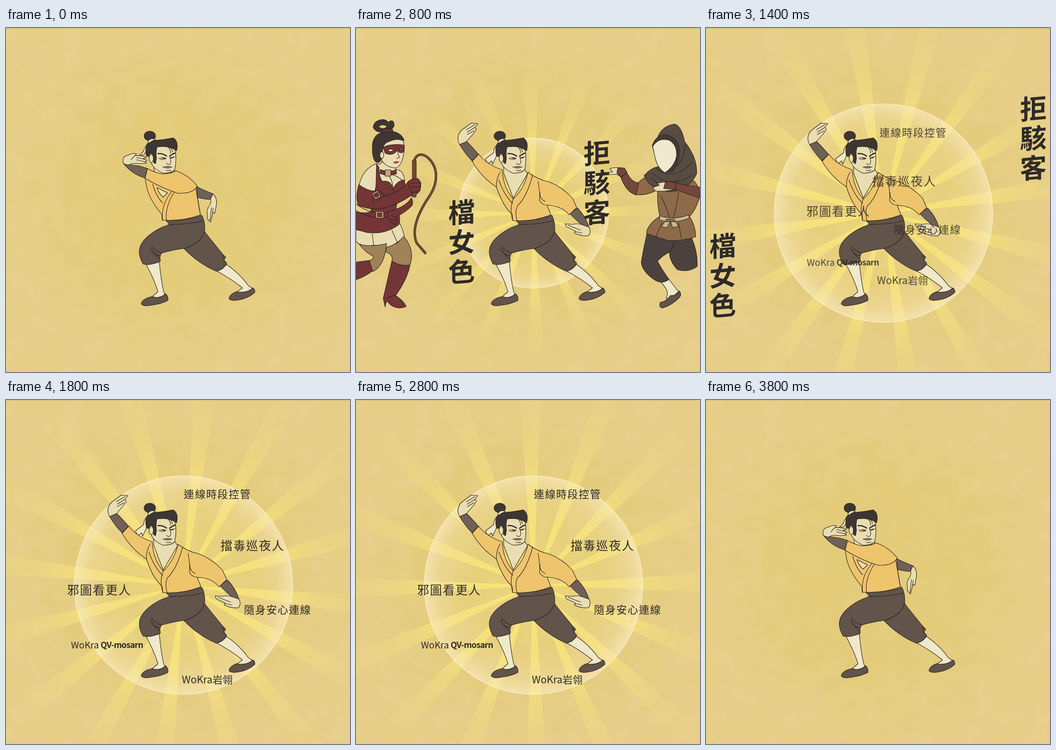
Write an HTML page that moves like this. It is 720x720 px and loops after 4000 ms.

```html
<!DOCTYPE html>
<html lang="zh-Hant">
<head>
<meta charset="utf-8">
<style>
  html, body { margin: 0; width: 100%; height: 100%; overflow: hidden; background: #e3cb7c; }
  svg { position: absolute; left: 0; top: 0; width: 100vw; height: 100vh; }
  .ink path, .ink ellipse, .ink rect { stroke: #2c231d; stroke-width: 1.1; stroke-linejoin: round; stroke-linecap: round; }
  .ink .line { fill: none; }
  .ink .bare { stroke: none; }
  .skin { fill: #e9deb2; }
  .sock { fill: #efe8cb; }
  .hair { fill: #3d3632; }
  .pants { fill: #62534b; }
  .cuff { fill: #706157; }
  .shirt { fill: #eec56d; }
  .red { fill: #743537; }
  .stocking { fill: #a08259; }
  .hood { fill: #574b44; }
  .coat { fill: #8d6b4a; }
  .glove { fill: #74473a; }
  .trousers { fill: #4b413e; }
  text { font-family: "Noto Sans CJK TC", "Noto Sans CJK", Lato, sans-serif; fill: #2d2a28; dominant-baseline: central; }
  #words text { font-size: 56px; font-weight: 700; text-anchor: middle; }
</style>
</head>
<body>
<svg viewBox="0 0 720 720">
  <defs>
    <filter id="paper" x="0" y="0" width="100%" height="100%">
      <feTurbulence type="fractalNoise" baseFrequency=".025" numOctaves="4" seed="4"/>
      <feColorMatrix values="0 0 0 0 .92  0 0 0 0 .82  0 0 0 0 .62  1.6 0 0 0 -.55"/>
    </filter>
    <radialGradient id="vignette">
      <stop offset=".4" stop-color="#e3ca70" stop-opacity=".35"/>
      <stop offset="1" stop-color="#e8d093" stop-opacity=".4"/>
    </radialGradient>
  </defs>
  <rect width="720" height="720" filter="url(#paper)" opacity=".22"/>
  <rect width="720" height="720" fill="url(#vignette)"/>
  <rect width="720" height="1" fill="#cdb565"/>
</svg>

<svg viewBox="0 0 720 720">
  <defs>
    <radialGradient id="beam" gradientUnits="userSpaceOnUse" cx="0" cy="0" r="460">
      <stop offset="0" stop-color="#fbe973" stop-opacity=".95"/>
      <stop offset=".45" stop-color="#f7e57a" stop-opacity=".72"/>
      <stop offset=".65" stop-color="#f1dd82" stop-opacity=".45"/>
      <stop offset="1" stop-color="#efda84" stop-opacity="0"/>
    </radialGradient>
    <radialGradient id="glass">
      <stop offset="0" stop-color="#fbe56e" stop-opacity=".4"/>
      <stop offset=".6" stop-color="#f6e28a" stop-opacity=".18"/>
      <stop offset=".85" stop-color="#f8e8b4" stop-opacity=".3"/>
      <stop offset="1" stop-color="#fbeec4" stop-opacity=".62"/>
    </radialGradient>
  </defs>

  <g id="burst">
    <g id="rays" fill="url(#beam)"></g>
    <circle r="228.5" fill="url(#glass)" stroke="#faefc4" stroke-width="1.3" vector-effect="non-scaling-stroke"/>
  </g>

  <g id="woman" class="ink">
    <path class="line" style="stroke-width:5" d="M121 285C123 262 138 261 150 271C174 292 171 325 155 350C133 382 114 420 127 450L145 471"/>
    <path class="line" style="stroke:#76513f;stroke-width:3" d="M121 285C123 262 138 261 150 271C174 292 171 325 155 350C133 382 114 420 127 450L145 471"/>
    <path class="red" d="M0 490Q16 488 31 486L35 508Q18 521 0 527Z"/>
    <path class="skin" d="M0 422Q40 434 91 408Q99 423 101 437Q84 455 64 459Q30 463 5 451L0 447Z"/>
    <path class="stocking" d="M7 453Q35 459 64 451Q60 498 35 510L28 487Q39 483 35 477Q20 470 7 453Z"/>
    <path class="stocking" d="M64 459Q86 453 100 436Q124 465 113 496Q93 500 75 488Q79 474 62 469Z"/>
    <path class="red" d="M75 488Q94 500 113 496Q108 525 83 560Q100 571 105 583Q88 590 73 580L64 571L61 584L57 566Q64 536 75 488Z"/>
    <path class="line" d="M34 431L37 455M75 423L87 450M31 455L42 455M82 452L91 446M65 566Q74 560 83 560"/>
    <path class="skin" d="M54 280Q53 287 42 284Q14 296 7 327L4 346L45 356L100 335Q105 318 97 303Q93 297 83 296L82 288Z"/>
    <path class="red" d="M43 285L48 291Q48 312 55 321Q74 318 77 337Q86 320 100 318Q107 333 98 351Q84 363 84 377Q95 394 90 411Q62 433 22 428L0 421V385Q28 390 32 382Q28 360 35 347Q42 340 42 325Z"/>
    <path class="skin bare" d="M70 310Q81 307 85 320L79 330Q72 323 70 310Z"/>
    <path class="line" d="M66 307Q77 316 77 337M72 306Q87 309 98 320M77 337Q81 347 92 349"/>
    <path class="red" d="M51 296Q66 303 84 297L85 305Q66 312 50 304Z"/>
    <rect x="61" y="297" width="12" height="13" fill="#c5a67b"/>
    <path class="red" d="M66 385Q105 375 116 355Q121 367 117 372Q104 386 83 396Q89 406 83 411Q70 408 67 399Z"/>
    <path class="red" d="M6 328Q27 344 48 341Q58 346 60 352Q82 347 103 330Q112 314 129 315Q138 323 134 340Q128 350 113 352Q91 368 59 377Q28 382 5 371Q-2 355 6 328Z"/>
    <path class="line" d="M0 368Q28 391 67 386M0 382Q30 400 67 396M40 341Q32 352 37 368M60 352Q48 357 44 364M74 392L84 397M70 399L82 404"/>
    <rect x="36" y="342" width="14" height="15" rx="2" fill="#b68d69" transform="rotate(-28 43 350)"/>
    <rect x="39" y="346" width="8" height="7" class="red" transform="rotate(-28 43 350)"/>
    <rect x="41" y="384" width="17" height="14" rx="2" fill="#c3a073"/>
    <rect x="45" y="387" width="9" height="8" class="red"/>
    <rect x="118" y="276" width="8" height="78" rx="3" class="glove"/>
    <path class="red" d="M109 322Q118 313 130 316L136 324L134 340L120 345Q110 337 109 322Z"/>
    <path class="line" d="M115 325L134 324M114 333L136 332"/>
    <path class="hair" d="M35 240Q39 220 63 216Q92 214 101 235Q84 230 69 239Q57 246 56 262L52 277Q47 285 40 279Q32 268 35 240Z"/>
    <path class="hair" d="M62 216Q43 222 36 208Q37 195 52 192Q63 190 67 198Q78 188 80 203Q78 214 62 216Z"/>
    <path class="bare" fill="#e3cb7c" d="M48 207Q55 200 64 206Q58 213 48 207Z"/>
    <path class="red" d="M54 215Q67 208 77 213L77 218Q65 214 55 220Z"/>
    <path class="skin" d="M56 253Q58 240 71 237Q86 230 99 236Q103 250 99 268Q94 291 82 293Q62 291 54 277Z"/>
    <ellipse class="skin" cx="54" cy="266" rx="4" ry="7"/>
    <path class="red" d="M57 250Q73 241 101 245L100 259Q92 264 86 257Q76 269 61 262Z"/>
    <path class="skin" d="M66 256Q73 251 79 256Q72 261 66 256ZM89 253L97 252Q95 257 89 253Z"/>
    <path class="line" d="M87 261L91 271L85 273"/>
    <path fill="#a64b47" class="bare" d="M77 281Q84 277 91 280Q84 287 77 281Z"/>
  </g>

  <g id="hacker" class="ink">
    <path class="sock" d="M637 531L655 526L675 552L660 565L649 566Q658 551 637 531Z"/>
    <path class="pants" d="M637 574Q651 572 658 560Q671 561 676 550Q683 557 677 564Q661 580 642 586Q633 585 637 574Z"/>
    <path class="trousers" d="M609 430Q660 447 702 438Q716 470 714 499Q697 512 673 506Q656 488 656 469Q642 476 631 488Q641 507 655 526Q643 536 628 529Q599 511 597 490Q602 460 609 430Z"/>
    <path class="coat" d="M632 333L708 320Q721 336 719 354Q711 382 698 394Q711 414 711 437Q681 447 650 444L608 430Q609 412 636 394Q629 365 632 333Z"/>
    <path class="coat" d="M590 325Q604 308 626 309L636 334Q616 351 584 349Z"/>
    <path class="glove" d="M553 309L566 301Q577 324 592 324L586 349Q565 344 553 309Z"/>
    <path class="skin" d="M527 303L537 301L531 294Q549 290 561 294L567 302L555 312L546 306L529 307Z"/>
    <path class="glove" d="M548 293L562 293L567 302L555 312L546 303Z"/>
    <path class="hood" d="M603 309Q616 293 633 290L638 272L631 230Q640 205 667 201Q681 205 688 238Q715 272 713 305Q704 325 683 337Q652 349 625 333Q612 328 603 309Z"/>
    <path class="line" d="M628 294Q665 322 703 281M619 301Q654 339 704 308M617 314Q648 341 683 336M690 242Q687 272 672 288"/>
    <path fill="#443a35" d="M620 246Q629 221 651 224Q675 231 677 256Q676 285 662 300Q641 304 629 278Z"/>
    <path fill="#f0e9d0" d="M621 248Q633 228 656 235Q672 244 671 267Q667 290 646 303Q632 294 627 275Z"/>
    <path class="glove" d="M668 324Q692 330 719 333L719 356Q688 345 665 337Z"/>
    <path class="skin" d="M621 334L635 329L630 325L647 322L668 322L669 337Q650 343 627 341Z"/>
    <path class="glove" d="M648 321L670 323L668 338L644 336Z"/>
    <path fill="#c8b68d" d="M636 393Q666 403 696 391L698 398Q665 411 635 402ZM650 400L639 416L651 418L658 405L663 418L675 415L666 400Z"/>
    <path class="line" d="M675 344Q672 370 664 397M638 352Q648 370 656 396M675 408L681 440M640 408L628 436M656 469Q664 458 667 447"/>
  </g>

  <g class="ink">
    <path class="sock" d="M438 507Q454 504 462 495Q490 515 507 539L517 546Q496 560 481 554L495 544Q470 524 438 507Z"/>
    <path class="pants" d="M482 552Q467 558 467 567Q473 572 488 569Q507 566 521 553Q521 547 517 544Q504 556 482 552Z"/>
    <path class="pants" d="M372 461C390 480 415 499 440 509Q456 506 462 492L455 486L460 480L455 475Q432 447 414 424Z"/>
    <path class="sock" d="M293 495L321 490Q324 525 330 552L334 560Q313 569 304 564L318 552Q310 525 293 495Z"/>
    <path class="pants" d="M306 562Q286 566 283 577Q286 584 306 580Q327 577 339 570Q340 562 334 556Q322 568 306 562Z"/>
    <path class="pants" d="M334 402Q372 405 410 392Q417 405 416 425Q409 450 375 461Q350 464 326 471L322 477L323 488Q302 498 287 494Q275 474 281 457Q288 440 312 425Q329 414 344 412Z"/>
    <path class="line" d="M338 411Q377 412 412 404M326 471Q312 468 304 456M324 477Q309 476 303 461M320 483L310 472M453 475L458 488"/>

    <g id="guard">
      <path class="sock" d="M304 238Q290 245 288 258L277 269L290 264Q296 250 305 241Z"/>
      <path class="skin" d="M309 284L311 305L329 352L354 305L352 294Z"/>
      <path class="cuff" d="M399 332Q417 341 433 347L427 359Q410 358 397 353Z"/>
      <path class="skin" d="M433 347Q443 356 440 372L437 388L433 386L428 406L424 402L422 400L421 388Q420 378 427 370Q430 363 428 358Z"/>
      <path class="line" d="M430 376L427 402M434 377L432 387"/>
      <path class="shirt" d="M296 294Q307 301 324 305Q344 306 356 299Q382 308 400 330Q398 345 407 391Q370 405 327 402L326 390Q297 356 293 325L291 314Z"/>
      <path class="skin" d="M316 334L338 345L329 354Q320 347 316 334Z"/>
      <path class="line" d="M292 315Q325 335 360 346Q392 347 400 331M307 327Q315 354 328 366M328 403Q323 372 347 342M336 403Q332 375 352 344M397 335L407 391"/>
      <path class="cuff" d="M246 284L257 286Q278 287 296 294L291 314Q264 306 246 284Z"/>
      <path class="skin" d="M246 284Q241 269 256 266Q265 261 273 263L270 267Q285 266 294 271L287 273L295 277L291 280L294 283L280 284Q266 281 256 287Z"/>
      <path class="line" d="M270 267Q263 273 262 276M291 275L273 271M291 280L273 276"/>
    </g>

    <g id="strike">
      <path class="sock" d="M303 238Q288 247 288 261L271 274L276 284L284 278L286 285Q296 264 305 242Z"/>
      <path class="skin" d="M309 284L309 304L329 356L359 305L352 294Z"/>
      <path class="skin" d="M217 244Q208 227 221 214L241 199L255 200L249 208L252 212L245 222L231 238Z"/>
      <path class="line" d="M231 213L249 202M233 218L249 208M233 223L247 215"/>
      <path class="cuff" d="M217 244L232 238Q246 252 256 264L243 278Q227 262 217 244Z"/>
      <path class="cuff" d="M447 388L464 377Q481 395 488 418L472 411Q460 402 447 388Z"/>
      <path class="skin" d="M488 417Q493 429 486 435Q470 436 457 429L459 425L440 416L438 410L454 411Q464 408 474 412Z"/>
      <path class="line" d="M444 413L470 423M458 426L473 429"/>
      <path class="shirt" d="M243 279L257 264Q272 285 306 297Q308 334 329 358Q352 337 360 302Q382 318 404 322Q432 333 453 356L462 376L446 391Q431 372 400 371L408 391Q370 406 328 403L327 390Q307 373 294 333Q262 312 243 279Z"/>
      <path class="line" d="M294 333Q293 315 302 301M299 318Q310 350 328 367M370 307Q357 355 338 372Q332 383 337 403M329 358Q321 377 328 403M381 321Q386 348 384 361Q390 371 400 371M385 344Q384 358 396 363"/>
    </g>

    <path class="skin" d="M306 250L304 280Q306 294 329 304Q346 304 353 297Q357 280 355 262L352 245Z"/>
    <ellipse class="hair" cx="301" cy="226" rx="12" ry="10"/>
    <path class="hair" d="M294 268Q288 240 306 236Q330 234 350 230Q362 237 357 257Q340 245 316 249Q313 262 315 272L313 284L309 282Q309 270 306 262Q300 262 299 269Z"/>
    <path class="sock" d="M297 237Q305 228 313 234Q304 236 299 242Z"/>
    <ellipse class="skin" cx="304" cy="273" rx="4.5" ry="8.5"/>
    <path class="line" d="M338 248Q346 255 344 262M343 249Q349 255 348 260M320 273Q328 270 335 273Q328 277 322 274M344 273Q350 269 354 270M342 268Q347 281 343 285Q338 287 336 283M335 298Q341 300 345 297"/>
    <path class="line" style="stroke-width:2.4" d="M318 263Q328 262 336 268M343 268Q349 263 354 262"/>
    <path class="line" style="stroke-width:2" d="M327 272L334 273M345 272L350 271"/>
    <path class="bare" fill="#9c8874" d="M328 291Q340 286 348 291Q338 298 328 291Z"/>
    <path class="line" d="M328 291L348 291"/>
  </g>

  <g id="words"></g>
  <g id="labels"></g>
</svg>

<script>
const $ = id => document.getElementById(id);
const show = (el, on) => el.style.display = on ? '' : 'none';
const move = (el, x, y, extra = '') => el.setAttribute('transform', `translate(${x} ${y}) ${extra}`);

function add(parent, tag, attrs, text = '') {
  const el = document.createElementNS('http://www.w3.org/2000/svg', tag);
  for (const key in attrs) el.setAttribute(key, attrs[key]);
  el.textContent = text;
  return parent.appendChild(el);
}

for (let i = 0; i < 16; i++)
  add($('rays'), 'path', { d: 'M0 0L-26 -460H26Z', transform: `rotate(${i * 22.5})` });

// vertical slogans: text, position at step 4, shift per step
const words = [
  ['檔女色', 221, 444, -62, 23.5],
  ['拒駭客', 504, 320, 60.3, -31]
].map(([text, x, y, dx, dy]) => {
  const g = add($('words'), 'g', {});
  [...text].forEach((c, i) => add(g, 'text', { x: 0, y: (i - 1) * 62, transform: 'skewY(-5)' }, c));
  return { g, x, y, dx, dy };
});

// labels: text, resting place, offset one step earlier, size, spacing, weight
const labels = [
  ['連線時段控管', 372, 195, -9, 22, 22, 1.5],
  ['擋毒巡夜人', 449, 303, -101, 16, 25, 1.8],
  ['邪圖看更人', 128, 396, 82, -14, 25, 1.8],
  ['隨身安心連線', 498, 437, -105, -17, 22, 1.5],
  ['WoKra', 136, 511, 75, -22, 19, .1],
  ['QV-mosarn', 198, 511, 75, -22, 17.5, -.8, 700],
  ['WoKra岩翎', 368, 584, -10, -57, 21, 0]
].map(([text, x, y, dx, dy, size, gap, weight = 500]) => ({
  x, y, dx, dy,
  g: add($('labels'), 'text', { 'font-size': size, 'letter-spacing': gap, 'font-weight': weight }, text)
}));

function draw(n) {
  const closing = n >= 17;
  const radius = closing ? 195 - (n - 17) * 35 : Math.min(228.5, 157 + 71 * (n - 4));
  show($('burst'), n >= 2 && n < 19);
  show($('rays'), !closing);
  $('burst').setAttribute('opacity', closing ? .7 - (n - 17) * .3 : 1);
  move($('burst'), 371.5, 387.5, `scale(${Math.max(radius, 1) / 228.5})`);
  $('rays').setAttribute('transform', `rotate(${6.5 + 7.5 * (Math.max(n, 5) - 9)})`);

  const striking = n >= 3 && !closing;
  show($('strike'), striking);
  show($('guard'), !striking);

  const away = n > 4 ? 100 : 24 * (4 - n);
  for (const [id, side] of [['woman', -1], ['hacker', 1]]) {
    show($(id), n >= 1 && n <= 5);
    move($(id), side * away, 0);
  }

  show($('words'), n >= 3 && n <= 7);
  $('words').setAttribute('opacity', n === 3 ? .6 : 1);
  for (const w of words) move(w.g, w.x + w.dx * (n - 4), w.y + w.dy * (n - 4));

  show($('labels'), n >= 6 && !closing);
  $('labels').setAttribute('opacity', n === 6 ? .4 : n === 7 ? .85 : 1);
  const inward = n === 6 ? 1.6 : n === 7 ? 1 : 0;
  for (const l of labels) move(l.g, l.x + l.dx * inward, l.y + l.dy * inward);
}

function tick() {
  draw(Math.floor(performance.now() % 4000 / 200));
  requestAnimationFrame(tick);
}
tick();
</script>
</body>
</html>
```
